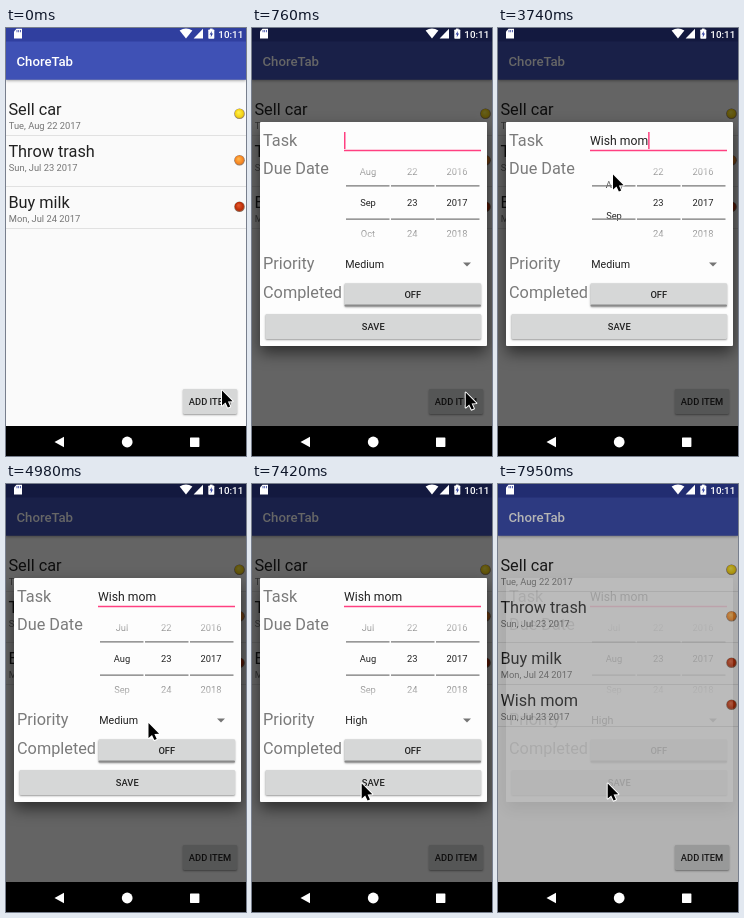
Animation, 240 px wide and 428 px high, one loop 8 s. Source, as an HTML page with a canvas:

```html
<!DOCTYPE html>
<html lang="en">
<head>
<meta charset="utf-8">
<title>ChoreTab</title>
<style>
html, body { margin: 0; width: 100%; height: 100%; overflow: hidden; background: #000; }
canvas { display: block; width: 240px; height: 428px; }
</style>
</head>
<body>
<canvas id="stage"></canvas>
<script>
const W = 240, H = 428, LOOP = 8000;
const INK = '#212121', GREY = '#7b7b7b', PAGE = '#fafafa', BUTTON = '#d6d7d7', PINK = '#ff4081';
const dpr = window.devicePixelRatio || 1;
const stage = document.getElementById('stage');
const sheet = document.createElement('canvas');
for (const c of [stage, sheet]) {
  c.width = W * dpr;
  c.height = H * dpr;
  c.getContext('2d').scale(dpr, dpr);
}
const main = stage.getContext('2d');
const layer = sheet.getContext('2d');
let g = main;

const KEYS = [1270, 1570, 1680, 1860, 1980, 2220, 2330, 2510];
const BLINKS = [1040, 1270, 2960, 3440, 3900, 4400, 4900, 5460, 5900, 6230, 6940];
const MONTHS = ['Jul', 'Aug', 'Sep', 'Oct'];
// time, x, y of the pointer
const PATH = [
  [0, 215, 361], [110, 212.7, 363], [2820, 212.7, 363], [3440, 114, 145],
  [4180, 114, 145], [4430, 146, 234], [4570, 142, 249], [4770, 142, 249],
  [4980, 141.5, 237.5], [5780, 141.5, 237.5], [6230, 131, 257], [6270, 131, 257],
  [6410, 125.7, 243.5], [7000, 125.7, 243.5], [7420, 108.7, 298], [LOOP, 108.7, 298]
];

const clamp = v => Math.min(1, Math.max(0, v));
const ramp = (t, a, b) => clamp((t - a) / (b - a));
const easeOut = p => 1 - (1 - p) ** 3;
const smooth = p => p * p * (3 - 2 * p);
const passed = (times, t) => times.filter(k => t >= k).length;

function box(x, y, w, h, fill, r = 0) {
  g.fillStyle = fill;
  g.beginPath();
  g.roundRect(x, y, w, h, r);
  g.fill();
}

function shape(points, fill) {
  g.fillStyle = fill;
  g.beginPath();
  points.forEach(([x, y]) => g.lineTo(x, y));
  g.closePath();
  g.fill();
}

function text(str, x, y, size, fill, weight = 400, align = 'left') {
  g.font = `${weight} ${size}px Roboto, sans-serif`;
  g.textAlign = align;
  g.fillStyle = fill;
  g.fillText(str, x, y);
}

function shadowed(blur, dy, alpha, draw) {
  g.save();
  g.shadowColor = `rgba(0,0,0,${alpha})`;
  g.shadowBlur = blur * dpr;
  g.shadowOffsetY = dy * dpr;
  draw();
  g.restore();
}

function button(label, x, y, w, h) {
  shadowed(2, 1, 0.4, () => box(x, y, w, h, BUTTON, 1.2));
  text(label, x + w / 2, y + h / 2 + 3.3, 9.33, INK, 500, 'center');
}

// Draws a group off screen and lays it down with one opacity
function group(alpha, draw) {
  if (alpha <= 0) return;
  layer.clearRect(0, 0, W, H);
  g = layer;
  draw();
  g = main;
  g.globalAlpha = alpha;
  g.drawImage(sheet, 0, 0, W, H);
  g.globalAlpha = 1;
}

function ball(x, y, light, dark) {
  const shade = g.createRadialGradient(x - 1, y - 1.5, 0.5, x, y, 5.2);
  shade.addColorStop(0, light);
  shade.addColorStop(0.75, dark);
  shade.addColorStop(1, '#8a7868');
  g.fillStyle = shade;
  g.beginPath();
  g.arc(x, y, 5.3, 0, 7);
  g.fill();
}

function row(title, date, top, height, light, dark) {
  const base = top + 22;
  text(title, 2.4, base, 16.3, INK);
  text(date, 2.8, base + 14, 9.33, '#757575');
  ball(233.5, top + height / 2 - 0.3, light, dark);
  box(0, top + height, W, 0.8, '#d8d8d8');
}

function list(added) {
  box(0, 0, W, 398, PAGE);
  shadowed(3, 1.5, 0.4, () => box(0, 13, W, 38.7, '#3f51b5'));
  box(0, 0, W, 13.4, '#303f9f');
  text('ChoreTab', 10.5, 38, 13.2, '#fff', 500);
  row('Sell car', 'Tue, Aug 22 2017', 65, 42, '#fff04a', '#f2cf10');
  row('Throw trash', 'Sun, Jul 23 2017', 107, 51, '#ffb347', '#f58220');
  row('Buy milk', 'Mon, Jul 24 2017', 158, 42, '#e2552a', '#b92c06');
  if (added) row('Wish mom', 'Sun, Jul 23 2017', 200, 42, '#e2552a', '#b92c06');
  button('ADD ITEM', 177, 361, 54, 25);
}

function statusIcons() {
  shape([[10.5, 0.8], [16, 0.8], [16, 10.5], [8, 10.5], [8, 3.4]], '#fff');
  for (const x of [10.6, 12.3, 14]) box(x, 2, 0.8, 2.2, '#303f9f');
  g.fillStyle = '#fff';
  g.beginPath();
  g.moveTo(180, 10.5);
  g.lineTo(173.6, 2.6);
  g.quadraticCurveTo(180, -1.6, 186.4, 2.6);
  g.fill();
  shape([[197, 0.8], [197, 10.5], [187.6, 10.5]], '#fff');
  box(202.3, 1.6, 6, 9.2, '#fff', 0.7);
  box(204, 0.6, 2.6, 1.4, '#fff');
  shape([[205.8, 3], [203.6, 6.6], [205, 6.6], [204.7, 9.4], [207, 5.6], [205.6, 5.6]], '#303f9f');
  text('10:11', 237.2, 10.2, 9.8, '#fff', 500, 'right');
}

function navBar() {
  box(0, 398, W, 30, '#000');
  shape([[48.5, 414], [58, 408.8], [58, 419.2]], '#fff');
  g.beginPath();
  g.arc(121.2, 414, 5.4, 0, 7);
  g.fill();
  box(184, 409.5, 9.4, 9.4, '#fff', 0.6);
}

function picker(t) {
  const fade = g.createLinearGradient(0, 132, 0, 218);
  fade.addColorStop(0, 'rgba(33,33,33,0)');
  fade.addColorStop(0.36, INK);
  fade.addColorStop(0.64, INK);
  fade.addColorStop(1, 'rgba(33,33,33,0)');
  const cell = (s, x, y) => text(s, x, y + 3.3, 9.33, fade, 400, 'center');
  const shift = 31 * easeOut(ramp(t, 3690, 4000));
  g.save();
  g.beginPath();
  g.rect(92, 135, 138, 80);
  g.clip();
  MONTHS.forEach((m, i) => cell(m, 116, 113 + 31 * i + shift));
  for (let i = -1; i < 2; i++) {
    cell(23 + i, 160.3, 175 + 31 * i);
    cell(2017 + i, 205, 175 + 31 * i);
  }
  g.restore();
  for (const x of [94, 139, 184])
    for (const y of [157.2, 190.5]) box(x, y, 43.5, 1.3, '#777');
}

function dialog(t) {
  shadowed(15, 7, 0.55, () => box(8, 94, 227, 224, '#fdfdfd', 1));
  text('Task', 11, 118, 16.3, GREY);
  text('Due Date', 11, 146, 16.3, GREY);
  text('Priority', 11, 241, 16.3, GREY);
  text('Completed', 11, 270.3, 16.3, GREY);

  const typed = 'Wish mom'.slice(0, passed(KEYS, t));
  text(typed, 92, 117.3, 12.2, INK);
  const end = 92 + g.measureText(typed).width;
  box(92, 121.8, 137, 1.5, PINK);
  if (passed(BLINKS, t) % 2 === 0) box(end, 104, 1.5, 17, PINK);

  picker(t);
  text(t < 6940 ? 'Medium' : 'High', 93.2, 240.2, 10.67, INK);
  shape([[211, 234.6], [219, 234.6], [215, 238.6]], '#757575');
  button('OFF', 92.5, 255.3, 136.5, 23);
  box(92.5, 276.4, 136.5, 2, '#8a8a8a', 1);
  button('SAVE', 13.5, 286, 215.5, 25);
}

function popup(grow) {
  const h = 99 * grow;
  shadowed(6, 2.5, 0.4, () => box(88, 220, 111, h, '#fff', 1));
  g.save();
  g.beginPath();
  g.rect(88, 220, 111, h);
  g.clip();
  ['High', 'Medium', 'Low'].forEach((s, i) => text(s, 93.2, 241.2 + 32.4 * i, 10.67, INK));
  g.restore();
}

function pointer(t) {
  const i = PATH.findIndex((p, k) => k && t <= p[0]);
  const [t0, x0, y0] = PATH[i - 1], [t1, x1, y1] = PATH[i];
  const p = smooth(ramp(t, t0, t1));
  g.save();
  g.translate(x0 + (x1 - x0) * p + 1, y0 + (y1 - y0) * p + 1.6);
  g.beginPath();
  [[0, 0], [0, 15], [3.5, 11.8], [5.9, 17], [8.2, 16], [5.9, 10.9], [10.6, 10.6]]
    .forEach(([x, y]) => g.lineTo(x, y));
  g.closePath();
  g.lineJoin = 'round';
  g.lineWidth = 2;
  g.strokeStyle = '#fff';
  g.stroke();
  g.fillStyle = '#000';
  g.fill();
  g.restore();
}

function draw(t) {
  const open = ramp(t, 420, 740);
  const closing = t >= 7900;
  const shown = closing ? (t < 7950 ? 0.55 : 0.13) : open;
  const dim = closing ? (t < 7950 ? 0.45 : 0.29) : 0.6 * open;
  list(closing);
  box(0, 0, W, 398, `rgba(0,0,0,${dim})`);
  statusIcons();
  group(shown, () => dialog(t));
  const drop = ramp(t, 5430, 5680);
  group(Math.min(drop, 1 - ramp(t, 6920, 7120)), () => popup(0.4 + 0.6 * easeOut(drop)));
  navBar();
  pointer(t);
}

const start = performance.now();
function tick() {
  draw((performance.now() - start) % LOOP);
  requestAnimationFrame(tick);
}
tick();
</script>
</body>
</html>
```
